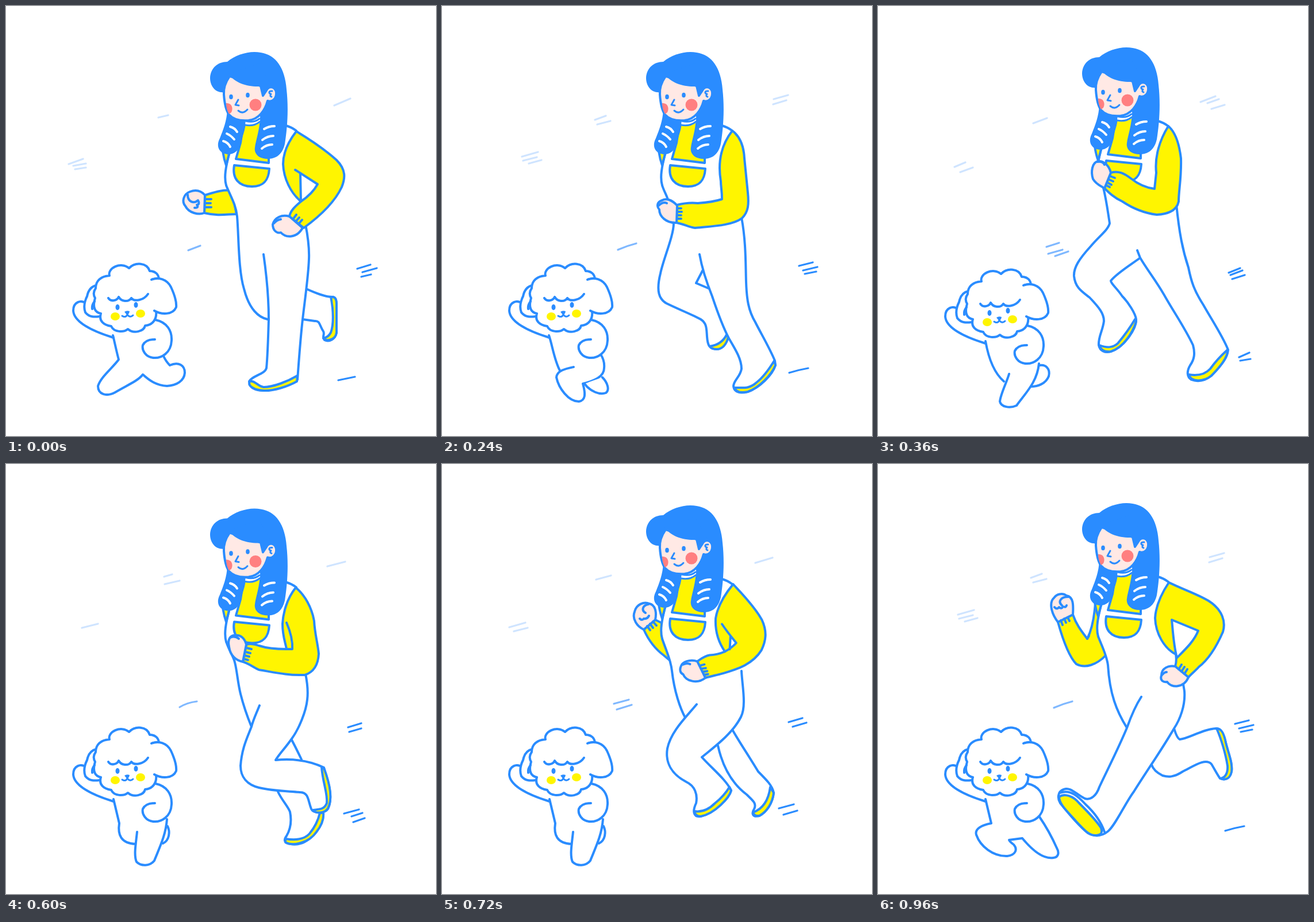
Animation of 748 by 748 pixels, one loop 1.05 s. Source, as an HTML page:

```html
<!DOCTYPE html>
<html lang="en">
<head>
<meta charset="utf-8">
<title>Jogging with the dog</title>
<style>
html, body { margin: 0; width: 100%; height: 100%; overflow: hidden; background: #fff; }
svg { display: block; width: 100vw; height: 100vh; }
path, ellipse { fill: #fff; stroke: #2a8cff; stroke-width: 4; stroke-linecap: round; stroke-linejoin: round; }
.n { fill: none; }
.y { fill: #fff500; }
.s { fill: #ffe9e5; }
.b { fill: #2a8cff; stroke: none; }
.w { stroke: none; }
.hi { fill: none; stroke: #fff; }
.pink { fill: #ff7f80; stroke: none; }
.lemon { fill: #fff500; stroke: none; }
.fine { fill: none; stroke-width: 3; }
.l1, .l2, .l3 { fill: none; stroke-width: 3.2; }
.l1 { stroke: #cfe4ff; }
.l2 { stroke: #7fb8ff; }
.pose { visibility: hidden; animation: show 1050ms step-end infinite; animation-delay: calc(var(--i) * 120ms - 1050ms); }
.pose.last { animation-name: brief; }
@keyframes show { 0% { visibility: visible } 11.42857%, 100% { visibility: hidden } }
@keyframes brief { 0% { visibility: visible } 8.57143%, 100% { visibility: hidden } }
</style>
</head>
<body>
<svg viewBox="0 0 748 748">
<defs>
  <path id="torso" class="w" d="M389,252C380,285 380,300 383,312C390,330 400,345 403,380L521,380 500,210Z"/>

  <g id="top">
    <path class="y" d="M377,252Q379,266 383,277L389,254Z"/>
    <path class="y" d="M413,205L408,238 400,266 457,273 457,240 443,200Z"/>
    <path class="y" d="M397,277L458,283C457,301 450,314 428,314C405,314 393,300 397,277Z"/>
    <path class="n" d="M389,254C382,280 379,298 383,312M487,208Q497,211 505,217"/>
    <path class="b" d="M380,150C365,152 355,140 355,125C356,108 368,97 385,97C400,84 425,77 443,81C470,85 485,108 488,145C492,180 489,215 485,240C481,258 470,266 455,266C440,266 431,257 433,246C434,235 442,215 442,190L417,195C418,215 411,225 409,238C405,251 398,258 386,258C372,257 364,245 372,230C378,215 384,200 385,180Z"/>
    <path class="w" d="M417,196L442,190 442,203Q430,211 416,208Z"/>
    <path class="fine" d="M417,200Q431,204 441,196M416,207Q431,210 442,201"/>
    <path class="s" d="M389,122C382,132 378,142 379,154C380,169 383,182 388,189C396,198 410,200 422,199C440,197 451,181 455,165C464,168 471,160 470,150C468,140 457,138 453,147L447,156 443,139Z"/>
    <path class="b" d="M387,118C398,134 420,141 442,140L447,155 455,142 462,138 440,100Z"/>
    <path class="pink" d="M383,169C392,168 396,177 392,185L388,188Q383,179 383,169Z"/>
    <ellipse class="pink" cx="434" cy="172" rx="10.500" ry="10.500"/>
    <ellipse class="b" cx="391.500" cy="158" rx="3.300" ry="4.300"/>
    <ellipse class="b" cx="420.500" cy="155" rx="3.300" ry="4.300"/>
    <path class="fine" d="M404,163L399,172 405,173M404,182Q412,189 420,180M463,148C456,147 457,153 461,153Q458,157 462,158"/>
    <path class="hi" d="M390,210Q398,212 402,219M384,222Q391,225 397,232M378,235Q386,237 390,245M449,214Q457,209 467,209M446,233Q455,226 465,226M445,248Q453,241 463,241"/>
  </g>

  <g id="farLow">
    <path class="y" d="M346,329C360,325 375,319 393,321L401,362C385,362 370,366 345,360Z"/>
    <path class="s" d="M346,329C338,320 328,320 320,323C309,327 305,340 312,348C318,360 335,364 345,360Z"/>
    <path class="n" d="M346,336H357M346,343H356M347,350H357M316,328C316,340 326,345 334,338M335,340Q337,345 332,346Q336,351 328,351"/>
  </g>
  <g id="farUp">
    <path class="y" d="M345,263C357,268 372,279 383,291L400,347C385,346 375,338 360,325C345,314 333,298 325,280Z"/>
    <path class="s" d="M345,263C348,248 344,237 335,235C325,231 312,236 309,249C304,262 314,275 325,280Z"/>
    <path class="n" d="M331,274L336,281M336,270L341,277M341,266L347,273M333,236C322,238 321,247 328,251M318,261Q322,265 325,261Q331,262 334,256"/>
  </g>

  <g id="armMid">
    <path class="y" d="M504,215C520,228 532,250 536,273C537,295 542,310 544,330C543,350 535,362 520,367C490,368 465,362 440,358C428,352 420,346 412,344L418,314C425,312 432,313 440,316C455,321 475,322 488,322C486,310 481,300 481,278C482,260 488,235 504,215Z"/>
    <path class="n" d="M488,322H498C499,305 494,290 488,276"/>
    <path class="s" d="M418,314C415,303 408,297 400,298C390,297 385,305 388,318C390,333 400,342 412,344Z"/>
    <path class="n" d="M419,320L427,322M417,327L425,329M415,333L423,335M414,339L421,341M390,302Q398,298 405,304"/>
  </g>
  <g id="armBack">
    <path class="y" d="M506,206C525,222 550,245 562,262C574,282 573,298 567,315C555,340 530,352 505,362C495,366 485,369 475,373L458,346C465,340 470,335 478,333Q492,331 504,324C492,310 483,290 482,268C483,250 490,230 506,206Z"/>
    <path class="w" d="M512,299L522,307 512,319Z"/>
    <path class="n" d="M494,277C503,288 512,297 522,307Q515,317 504,324M511,297L512,319"/>
    <path class="s" d="M458,346C450,344 437,346 432,354C427,365 432,370 436,371C442,382 462,386 475,373Z"/>
    <path class="n" d="M463,353L471,350M466,358L474,356M469,363L477,361M472,368L479,366M434,354Q440,350 446,352"/>
  </g>

  <g id="pup">
    <path d="M140,518C130,510 117,515 117,530C118,549 148,565 187,577"/>
    <path d="M157,486C148,488 143,495 141,505C136,515 135,525 138,533C145,542 155,541 163,540"/>
    <path d="M260,546C280,550 289,565 288,582C287,604 270,613 257,612C243,611 236,599 238,590C242,582 250,580 259,580"/>
    <path d="M266,476C266,467 260,461 250,461C245,446 225,445 214,456C200,444 176,456 180,469C165,470 156,478 156,491C151,498 152,503 155,508C150,525 155,533 165,535C161,548 170,555 183,557C188,568 205,568 212,562C222,571 240,566 242,556C255,555 263,545 261,530"/>
    <path d="M253,476C265,471 280,475 287,489C293,502 297,515 296,524C290,538 270,537 258,530"/>
    <path class="n" d="M154,514Q149,520 150,527M178,508C182,515 193,513 196,506C200,514 213,516 218,508C223,515 240,512 247,501"/>
    <ellipse class="lemon" cx="190" cy="540" rx="8" ry="7"/>
    <ellipse class="lemon" cx="234" cy="535" rx="8" ry="7"/>
    <ellipse class="b" cx="194" cy="524" rx="3.500" ry="5"/>
    <ellipse class="b" cx="226" cy="520" rx="3.500" ry="5"/>
    <path class="b" d="M206,532Q210,529 215,531Q214,537 210,537Z"/>
    <path class="fine" d="M202,539Q208,543 211,537Q216,543 221,538"/>
  </g>
  <g id="dogWide">
    <path d="M186,573C189,585 192,600 196,615C185,630 165,645 160,661C160,676 175,680 190,672C210,660 230,652 238,641C250,652 262,660 280,661C297,660 310,652 311,638C311,625 300,618 285,625Q278,618 274,609"/>
    <use href="#pup"/>
  </g>
  <g id="dogStep">
    <path class="n" d="M186,573C192,590 195,615 205,634M276,606C280,612 283,620 282,630C282,645 265,652 245,657"/>
    <path d="M248,657C258,671 275,677 285,673C292,668 288,655 279,646"/>
    <path d="M229,628C215,631 200,634 199,646C203,665 220,688 238,688C250,686 250,675 245,657"/>
    <use href="#pup"/>
  </g>
  <g id="dogPass">
    <path d="M278,626C292,621 300,632 297,644C292,657 278,662 266,662"/>
    <path class="n" d="M187,583C190,600 198,635 219,653"/>
    <path d="M228,640C225,652 213,675 212,688C214,698 230,700 241,695C255,675 277,655 280,622"/>
    <use href="#pup" y="10"/>
  </g>
  <g id="dogStand">
    <path d="M281,630C286,640 284,655 273,660"/>
    <path class="n" d="M187,583L197,625C194,645 200,660 225,661"/>
    <path d="M228,640C226,660 222,680 227,692C235,700 250,700 258,690C268,665 278,645 280,618"/>
    <use href="#pup" y="10"/>
  </g>
  <g id="dogLeap">
    <path d="M187,583L197,625C180,628 168,635 171,645C178,665 200,683 225,682C240,680 243,670 236,662Q228,656 228,654L251,651C265,668 285,688 305,685C315,684 315,675 311,668C303,650 292,630 281,614"/>
    <use href="#pup" y="10"/>
  </g>

  <g id="windB">
    <path class="l1" d="M139,262L167,254M141,269L165,263M151,274L173,268M266,198L285,191M270,206L293,200M577,162L602,155M576,171L599,164"/>
    <path class="l2" d="M306,424Q322,417 338,413"/>
    <path class="l3" d="M621,452L645,446M628,460L653,454M631,466L651,462M604,638Q620,633 637,630"/>
  </g>
  <g id="windE">
    <path class="l1" d="M133,283L157,276M135,292L160,286M265,212L290,207M532,165L554,157M551,171L570,166"/>
    <path class="l2" d="M298,411L322,407M291,425L315,418M306,428L331,419"/>
    <path class="l3" d="M609,437L630,428M621,442L644,435M591,591L614,584M598,601L614,597M582,615L610,608"/>
  </g>
</defs>

<g class="pose" style="--i:0">
  <path class="l1" d="M109,275L134,266M117,278L139,274M120,284L139,281M265,194L282,190M571,173L599,161"/>
  <path class="l2" d="M317,425L338,417"/>
  <path class="l3" d="M611,457L634,450M620,463L645,456M618,471L635,467M578,651L607,645"/>
  <use href="#dogWide"/>
  <use href="#farLow"/><use href="#torso"/>
  <path class="n" d="M383,312C390,330 400,345 402,366C405,400 404,460 414,492C423,528 440,542 455,545"/>
  <path d="M520,491C540,500 555,506 567,506C574,506 575,512 575,522L575,568C573,580 562,585 554,581C549,576 555,571 552,566C545,555 546,547 537,548L516,545"/>
  <path class="y" d="M565,506C570,530 570,555 565,568C562,574 557,577 552,578C556,584 573,582 575,568L575,520C575,510 573,505 565,506Z"/>
  <path d="M448,432C452,460 457,500 457,545C456,580 455,610 453,630C450,641 428,643 423,653C424,668 440,670 455,668C478,666 495,660 507,650C510,610 512,580 516,545C520,510 526,470 527,440C528,415 524,395 521,380"/>
  <path class="y" d="M424,653C433,651 437,661 448,663C465,663 490,653 507,643L506,653C490,662 465,670 448,669C430,668 420,660 424,653Z"/>
  <use href="#top"/>
  <path class="y" d="M505,218C525,230 555,250 575,268C592,285 590,300 584,315C570,345 540,370 518,386L493,366C495,355 505,347 513,340C495,325 483,300 482,275C482,260 488,240 505,218Z"/>
  <path d="M503,285L542,310C535,323 525,332 513,340L512,291"/>
  <path class="s" d="M493,366C480,362 467,368 464,380C464,392 473,396 478,394C487,404 506,404 516,386Z"/>
  <path class="n" d="M499,371L505,363M504,375L510,368M509,379L515,372M466,378Q471,372 478,371"/>
</g>

<g class="pose" style="--i:1">
  <use href="#windE"/><use href="#dogStep"/>
  <use href="#farLow" x="24" y="5"/><use href="#torso"/>
  <path d="M529,526C540,532 552,538 557,546C558,570 552,590 540,592C532,590 536,583 533,575"/>
  <path class="y" d="M557,546C558,570 552,590 540,592Q535,591 535,585C546,583 551,565 551,541Z"/>
  <path class="n" d="M383,312C392,333 402,355 403,380C400,420 385,460 388,492C395,525 440,540 475,547"/>
  <path d="M448,432C455,470 468,510 475,550C482,585 488,610 488,630C485,643 466,645 464,656C464,668 480,671 495,669C515,664 540,650 545,638C540,610 533,580 530,550C526,520 528,470 528,440C528,415 524,390 521,375"/>
  <path class="y" d="M465,655C475,655 480,665 496,662C515,657 532,646 544,632L545,640C535,655 515,668 490,670C472,670 462,664 465,655Z"/>
  <use href="#top"/><use href="#armBack" y="11"/>
</g>

<g class="pose" style="--i:2">
  <use href="#windB"/><use href="#dogStep"/>
  <path class="n" d="M383,312C387,325 394,334 395,345M403,378C403,400 385,440 380,465C372,497 378,510 390,517C410,527 438,538 450,545C461,552 460,562 461,575C462,590 465,597 478,597C490,596 495,585 497,575M455,457L442,482 468,493"/>
  <path class="y" d="M466,592C480,590 489,584 495,572L498,576C495,588 488,597 478,597Q469,597 466,592Z"/>
  <path d="M448,432C452,455 460,480 470,505C480,535 488,557 499,578C512,600 521,615 521,631C519,645 508,650 507,661C508,673 520,674 532,671C552,664 575,642 580,625L579,617C570,595 555,570 545,550C533,530 530,510 529,480C528,450 529,410 521,368"/>
  <path class="y" d="M509,664C525,664 535,666 547,655C560,645 570,630 578,617L580,625C573,642 552,664 532,671Q512,675 509,664Z"/>
  <use href="#top"/>
  <path class="y" d="M505,217C520,228 525,245 526,265L532,325C534,345 533,358 522,369C505,382 470,383 440,386C430,385 420,379 408,377L409,346C425,342 435,342 445,343C460,342 475,340 487,336C487,320 485,315 485,305C480,275 483,245 505,217Z"/>
  <path class="s" d="M409,347C400,337 390,334 383,338C374,341 373,348 378,354C378,366 390,378 408,377Z"/>
  <path class="n" d="M409,352H416M409,358H417M409,364H416M409,370H416M377,347Q385,340 391,343"/>
</g>

<g class="pose" style="--i:3">
  <path class="l1" d="M133,280L152,272M143,289L165,281M270,204L294,195M561,167L587,157M573,169L593,162M580,179L603,172"/>
  <path class="l2" d="M293,419L315,412M296,431L321,424M308,435L331,427"/>
  <path class="l3" d="M610,464L630,456M613,468L634,460M616,475L638,468M628,611L646,603M630,617L648,614"/>
  <use href="#dogPass"/>
  <path d="M391,312C398,340 400,360 403,378C400,390 385,400 370,418C350,440 340,455 341,470C343,490 355,497 368,507C385,525 393,535 393,548C391,565 383,575 384,590C386,600 395,604 405,601C430,592 450,560 449,545C448,535 435,515 425,505C415,490 405,483 405,478C415,465 440,450 456,438"/>
  <path class="y" d="M385,590C398,595 408,595 417,587C427,575 437,562 447,545L449,549C444,566 428,594 405,601Q389,603 385,590Z"/>
  <path d="M451,425L456,438C469,460 483,477 498,503C513,530 534,560 548,590C552,605 550,615 543,625C537,635 537,645 545,650C558,655 570,651 580,643C593,628 608,614 609,598C600,575 580,545 566,520C550,495 545,480 540,455C530,425 524,395 519,345"/>
  <path class="y" d="M540,641C557,644 569,641 578,631C588,617 598,607 608,598C610,610 593,630 580,643C568,653 545,656 540,641Z"/>
  <use href="#top" y="-8"/>
  <path class="y" d="M505,209C518,220 524,240 527,265C528,300 523,320 523,340C520,355 505,362 485,363C460,360 440,350 425,340C410,333 402,325 394,317L405,290C418,286 428,291 440,300C450,308 465,316 481,318L484,290C481,262 490,233 505,209Z"/>
  <path class="s" d="M405,290C402,277 392,269 383,270C372,272 370,289 374,301C380,311 388,313 394,317Z"/>
  <path class="n" d="M404,296L412,299M402,302L409,305M399,307L406,311M397,312L403,315M382,271Q391,270 394,276"/>
</g>

<g class="pose" style="--i:4">
  <path class="l1" d="M130,276L157,268M136,287L158,281M271,199L297,191M560,172L588,164M574,178L597,171"/>
  <path class="l2" d="M297,421L322,414M304,431L329,424"/>
  <path class="l3" d="M603,459L627,452M608,468L631,461M616,610L642,602M630,619L655,612"/>
  <use href="#dogPass"/>
  <path d="M383,306C394,330 402,350 403,375C400,400 390,430 388,460C390,500 410,540 418,565C425,590 425,610 418,622C410,635 408,645 420,648C445,650 480,622 483,608C478,580 465,555 460,518"/>
  <path class="y" d="M414,638C425,640 435,640 447,632C460,624 472,614 480,600L483,608C478,624 445,650 420,648Q413,646 414,638Z"/>
  <path d="M445,425C440,445 445,490 462,520C480,550 520,565 550,575C560,585 562,600 570,605C585,607 595,590 596,575C597,555 590,545 583,540C560,530 535,515 525,490C530,460 528,400 520,355"/>
  <path class="y" d="M583,540C588,560 590,580 586,590Q580,600 566,600C570,609 590,602 596,575Q597,550 583,540Z"/>
  <use href="#top" y="-6"/><use href="#armMid" x="-2" y="-5"/>
</g>

<g class="pose" style="--i:5">
  <path class="l1" d="M132,285L160,278M275,196L289,192M276,209L302,203M559,178L590,170"/>
  <path class="l2" d="M302,423Q315,415 332,413"/>
  <path class="l3" d="M595,458L618,451M597,466L618,460M588,608L614,601M601,613L620,607M604,623L624,616"/>
  <use href="#dogStand"/>
  <path class="n" d="M383,309C388,325 396,335 398,345C402,360 403,380 408,400C413,420 420,440 427,457"/>
  <path d="M473,570C480,585 490,595 494,605C497,620 495,635 488,647C482,655 485,660 495,661C515,665 530,652 540,640C548,628 553,618 552,606M496,478Q505,495 514,514"/>
  <path class="y" d="M486,652C505,655 520,652 528,643C537,632 543,620 546,607H552C553,618 548,630 540,640C528,658 500,666 486,658Z"/>
  <path d="M441,420C435,435 430,445 427,457C420,475 410,495 408,525C408,545 420,558 440,563C465,569 490,569 512,571C527,572 525,585 531,600C535,609 555,608 560,600C570,580 560,550 553,528C530,517 500,512 469,515C475,505 485,495 497,478C510,460 522,430 524,410C526,395 524,380 521,365"/>
  <path class="y" d="M549,527C551,555 560,573 558,590C553,602 545,600 534,602C540,609 555,607 560,599C570,580 561,550 553,529Z"/>
  <use href="#top" y="-2.500"/><use href="#armMid"/>
</g>

<g class="pose" style="--i:6">
  <path class="l1" d="M117,284L145,276M125,291L149,285M268,201L294,194M545,172L575,163"/>
  <path class="l2" d="M299,417L325,410M304,427L330,419"/>
  <path class="l3" d="M603,449L627,442M610,457L634,450M586,599L612,592M594,610L618,603"/>
  <use href="#dogStand"/>
  <use href="#farUp" x="26" y="8"/><use href="#torso" y="-8"/>
  <path class="n" d="M383,304C390,325 398,340 400,360C404,395 414,425 424,443"/>
  <path d="M505,462C515,480 535,510 550,535C565,550 575,560 577,572C575,590 565,605 552,612C540,615 538,608 543,600C548,590 540,585 530,575C510,560 490,535 480,490"/>
  <path class="y" d="M541,606C558,600 568,585 571,562L577,572C575,590 565,605 552,612Q543,613 541,606Z"/>
  <path d="M443,418C425,440 398,465 392,495C388,520 400,540 425,553C440,560 445,575 442,590C435,605 438,615 450,613C475,608 500,580 503,568C495,550 470,530 452,510C470,495 505,470 520,440C530,420 522,385 521,360"/>
  <path class="y" d="M439,604C452,606 465,600 475,590C485,582 494,572 500,562L503,568C500,580 475,608 450,613Q440,613 439,604Z"/>
  <use href="#top" y="-8"/>
  <g transform="translate(0 3) rotate(6 505 210)"><use href="#armBack"/></g>
</g>

<g class="pose" style="--i:7">
  <use href="#windE"/><use href="#dogLeap"/>
  <use href="#farUp"/><use href="#torso" y="-12"/>
  <path class="n" d="M383,300C390,318 398,333 400,350C403,370 402,385 407,402Q413,422 422,436"/>
  <path d="M511,452C517,470 530,480 545,486C560,492 575,493 588,495C595,497 597,505 599,520L602,560C600,568 592,571 583,572C575,572 580,565 575,560C568,550 568,542 560,542C530,540 500,530 485,515C475,507 468,500 467,494"/>
  <path class="y" d="M585,496C590,515 595,540 594,552C592,564 588,568 580,570C584,573 600,571 602,560L599,520C597,505 595,496 585,496Z"/>
  <path d="M447,415C435,428 410,445 395,467C380,490 381,510 385,530C390,555 405,580 404,600C402,615 390,620 387,630C385,642 400,644 412,642C435,632 455,618 462,607Q464,600 461,595C455,570 448,545 444,520C443,510 455,502 465,495C490,472 515,455 525,430C532,415 521,380 520,356"/>
  <path class="y" d="M388,633C400,630 408,635 418,630C435,620 450,607 460,596Q464,600 462,607C455,618 435,632 412,642C402,644 389,643 388,633Z"/>
  <use href="#top" y="-12"/><use href="#armBack"/>
</g>

<g class="pose last" style="--i:8">
  <use href="#windB"/><use href="#dogLeap"/>
  <path class="y" d="M339,262C345,280 355,292 364,304C371,290 376,270 378,242L392,250 397,332C380,350 360,356 345,348C332,335 320,300 313,275Z"/>
  <path class="s" d="M339,262C340,245 340,231 328,229C320,223 310,227 306,233C298,240 300,258 313,275Z"/>
  <path class="n" d="M318,272L321,280M324,269L327,276M330,267L333,273M364,304L367,299M331,231C317,231 313,240 320,246M307,249Q311,254 315,249Q319,253 322,248Q327,250 328,246"/>
  <use href="#torso" y="-12"/>
  <path class="n" d="M383,300C390,318 398,333 400,350C403,400 415,430 433,459"/>
  <path d="M515,460C518,470 522,478 525,479C540,478 565,461 588,460C597,460 602,470 605,485C610,505 617,520 615,535C612,546 605,551 595,547C590,540 585,530 580,522C570,511 550,525 530,535C515,545 505,545 495,542C485,537 478,530 476,523"/>
  <path class="y" d="M589,460C597,478 605,505 608,525C609,539 603,546 596,547C606,551 613,546 615,535C617,520 610,505 605,485C602,470 598,460 589,460Z"/>
  <path d="M458,405C445,425 438,445 433,459C418,495 400,530 385,562C380,577 370,585 360,582C345,575 335,561 323,566C312,570 312,582 317,590C335,612 350,630 365,642C378,649 390,647 400,639C412,630 430,590 445,570C470,530 495,495 515,460C525,445 535,420 533,395L531,383"/>
  <path class="n" d="M317,572C335,565 350,580 361,592C375,605 388,622 394,640"/>
  <path class="y" d="M315,579C325,572 340,578 350,590C365,605 380,620 388,633C391,642 388,645 380,646C368,647 360,638 345,622C330,605 315,592 315,579Z"/>
  <use href="#top" y="-12"/>
  <path class="y" d="M506,206C530,218 555,226 575,238C600,254 605,275 600,292C590,315 575,340 558,353C552,360 545,365 540,371L517,352Q520,342 518,331C498,321 483,295 482,268C483,250 490,230 506,206Z"/>
  <path d="M511,271L557,290C550,308 535,322 520,337C514,315 513,290 511,271Z"/>
  <path class="s" d="M517,352C505,350 493,355 493,368C490,377 497,380 503,379C510,390 532,390 540,371Z"/>
  <path class="n" d="M523,357L528,349M528,361L533,353M533,365L538,357M494,367Q498,362 502,362"/>
</g>
</svg>
</body>
</html>
```
